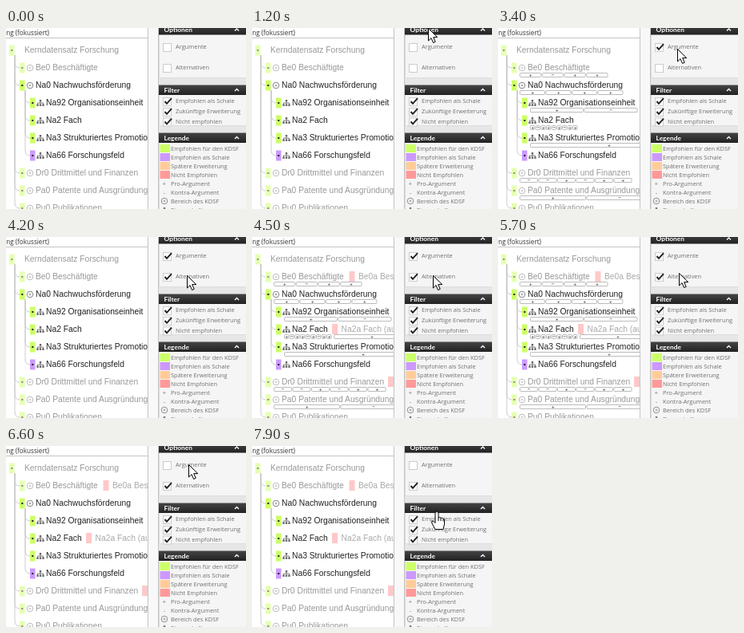
Recreate the animation shown at these times as an HTML page. Size 300 by 227 pixels, loop 8000 ms.

```html
<!DOCTYPE html>
<html lang="de">
<meta charset="utf-8">
<title>Kerndatensatz Forschung</title>
<style>
html, body { margin: 0; width: 100%; height: 100%; overflow: hidden; background: #fff }
svg { display: block }
.tree { font: 10.3px "Liberation Sans", Arial, sans-serif }
.panel { font: 7.45px "Open Sans", "Noto Sans", sans-serif; fill: #707070 }
.head { font: 700 8.4px Lato, "Open Sans", sans-serif; fill: #fff }
.sign { font: 700 6px "Liberation Sans", Arial, sans-serif; text-anchor: middle; fill: #555 }
</style>
<svg id="stage" width="300" height="227" viewBox="0 0 300 227">
  <defs>
    <clipPath id="treeClip"><path d="M0 14H177V227H0Z"/></clipPath>
    <linearGradient id="bar" x2="0" y2="1"><stop stop-color="#444"/><stop offset="1" stop-color="#222"/></linearGradient>
  </defs>
  <g id="tree" class="tree" clip-path="url(#treeClip)"></g>
  <path d="M178 0H190V227H178Z" fill="#f8f8f8"/>
  <path d="M190 0H300V227H190Z" fill="#e6e6e6"/>
  <path d="M0 12.5H177M177.5 0V227M190.5 0V227" stroke="#c4c4c4" fill="none"/>
  <text x="54" y="9" text-anchor="end" fill="#333" style="font:8.15px 'Open Sans','Noto Sans',sans-serif">Forschung (fokussiert)</text>
  <g id="panel" class="panel"></g>
  <path id="arrow" d="M.5 .5V16L4 12.6 6.6 18.5 9.2 17.3 6.7 11.6H11.8Z" fill="#fff" stroke="#000"/>
  <g id="hand" stroke="#000" stroke-linejoin="round">
    <path d="M-2 1.5Q0 -.8 2 1.5V8Q3.5 6.5 5 8.3Q7 7.3 8 9.3Q9.3 9 9.5 11V16L8 22.5H-2L-6 15Q-7 11.5 -4.5 12L-2 14.5Z" fill="#fff"/>
    <path d="M2 8V12M5 8.5V12M8 9.5V12.5" fill="none"/>
  </g>
</svg>
<script>
const $ = id => document.getElementById(id);
const text = (x, y, s, attrs = '') => `<text x="${x}" y="${y}" ${attrs}>${s}</text>`;
const rect = (x, y, w, h, attrs) => `<rect x="${x}" y="${y}" width="${w}" height="${h}" ${attrs}/>`;
const line = (d, color, width = 1) => `<path d="${d}" fill="none" stroke="${color}" stroke-width="${width}"/>`;

const area = (x, y, c) => `<g fill="none" stroke="${c}" stroke-width=".8"><circle cx="${x}" cy="${y}" r="3.8"/>
  <circle cx="${x}" cy="${y}" r="1" stroke-width=".6"/></g>`;
const shell = (x, y, c) => line(`M${x} ${y - 3}V${y + 2}M${x - 3.5} ${y + 2}V${y}H${x + 3.5}V${y + 2}`, c, .8) +
  [[0, -3.5], [-3.5, 2], [0, 2], [3.5, 2]].map(([dx, dy]) =>
    rect(x + dx - 1.2, y + dy - .5, 2.4, 2.4, `fill="${c}"`)).join('');

// label, level, faded, signs of the arguments, right end of the argument row
const nodes = [
  ['Kerndatensatz Forschung', 0, 1],
  ['Be0 Beschäftigte', 1, 1, '+-++', 138],
  ['Na0 Nachwuchsförderung', 1, 0, '++++', 157],
  ['Na92 Organisationseinheit', 2, 0, '+-', 175],
  ['Na2 Fach', 2, 0, '+-++-+-++', 100],
  ['Na3 Strukturiertes Promotionsprogramm', 2, 0, '+', 238],
  ['Na66 Forschungsfeld', 2, 0],
  ['Dr0 Drittmittel und Finanzen', 1, 1, '--+-++', 168],
  ['Pa0 Patente und Ausgründungen', 1, 1, '+-', 194],
  ['Pu0 Publikationen', 1, 1]
];
const rowY = i => 28 + 22 * i;

function branch(x, from, to) {
  return line(`M${x} ${from}V${to - 7}Q${x} ${to} ${x + 6} ${to}`, '#ccc');
}

function args(signs, left, right, y) {
  const w = (right - left) / signs.length;
  return [...signs].map((s, i) => {
    const x = left + i * w;
    return rect(x + .5, y - 2.5, w - 1.5, 5, 'rx="1" fill="#fff" stroke="#aaa" stroke-width=".8"') +
      text(x + w / 2, y + 2, s === '-' ? '−' : s, 'class="sign"');
  }).join('');
}

function alternative(x, row, label) {
  const y = rowY(row);
  return rect(x, y - 7, 7, 13, 'fill="#ffc8c8"') + text(x + 11.5, y + 3.4, label, 'fill="#aaa"');
}

let links = '', items = '', argRows = '';
nodes.forEach(([label, level, faded, signs, right], i) => {
  const y = rowY(i), x = 4 + 13 * level, ink = faded ? '#999' : '#222';
  if (level) links += branch(level === 1 ? 11 : 24, level === 1 ? 34 : 78, y);
  const fill = i === 6 ? '#c9f' : faded ? '#e5ffb2' : '#cf6';
  items += rect(x, y - 6.5, 6.5, 13, `fill="${fill}"`) +
    rect(x + 2.3, y - 1, 2, 2, `fill="${faded ? '#888' : '#222'}"`);
  if (level) items += (level === 1 ? area : shell)(x + 13, y, faded ? '#aaa' : '#666');
  items += text([23, 37, 50][level], y + 3.4, label, `fill="${ink}"`);
  if (signs) argRows += args(signs, 14 + 13 * level, right, y + 9);
});
$('tree').innerHTML = links + items + `<g id="args">${argRows}</g><g id="alts">` +
  alternative(121.5, 1, 'Be0a Beschäftigte') +
  alternative(100, 4, 'Na2a Fach (auch andere)') +
  alternative(170, 7, 'Dr0a Drittmittel') +
  `</g><g id="altArgs">${args('+', 102, 198, rowY(4) + 9)}</g>`;

const header = (y, label) => rect(191, y, 109, 12.5, 'fill="url(#bar)"') +
  text(197.5, y + 9.3, label, 'class="head"') +
  line(`M286 ${y + 7.5}L288.5 ${y + 5}L291 ${y + 7.5}`, '#fff', 1.3);
const frame = (y, h) => rect(191.5, y + .5, 112, h, 'fill="#f5f5f5" stroke="#ddd"');
const check = (y, label, id) => rect(196.5, y - 4.5, 10, 10, 'fill="#fff" stroke="#ccc"') +
  `<path id="${id}" d="M198.5 ${y}L201 ${y + 2.8}L207 ${y - 3.8}" fill="none" stroke="#222" stroke-width="2"/>` +
  text(212, y + 2.2, label);

const swatches = [['#cf6', 'Empfohlen für den KDSF'], ['#c9f', 'Empfohlen als Schale'],
  ['#fc9', 'Spätere Erweiterung'], ['#f99', 'Nicht Empfohlen']];
const symbols = ['Pro-Argument', 'Kontra-Argument', 'Bereich des KDSF', 'Eigenschaft'];
$('panel').innerHTML =
  frame(0, 62) + header(-4, 'Optionen') +
  check(24, 'Argumente', 'argCheck') + check(50, 'Alternativen', 'altCheck') +
  frame(72, 50) + header(71.5, 'Filter') +
  check(92, 'Empfohlen als Schale', 'shellCheck') + check(105, 'Zukünftige Erweiterung', 'laterCheck') +
  check(117.5, 'Nicht empfohlen', 'notCheck') +
  frame(132, 110) + header(131.5, 'Legende') +
  swatches.map(([c, s], i) => rect(192.5, 146 + 11 * i, 12.5, 10, `fill="${c}"`) +
    text(206, 154 + 11 * i, s)).join('') +
  symbols.map((s, i) => text(206, 198 + 11 * i, s)).join('') +
  text(198, 198, '+', 'text-anchor="middle"') + text(198, 209, '-', 'text-anchor="middle"') +
  area(198, 217, '#777') + shell(198, 229, '#777');

// start time, steps, from x, y, to x, y
const moves = [
  [1000, 7, 217, -16, 224, 24],
  [3400, 5, 224, 24, 226, 48],
  [5700, 5, 226, 48, 228, 23],
  [7500, 5, 228, 23, 231, 82]
];

function pointer(t) {
  const [start, steps, x0, y0, x1, y1] = moves.findLast(m => t >= m[0]);
  const k = Math.min(1, (Math.floor((t - start) / 100) + 1) / steps);
  const e = k * k * (3 - 2 * k);
  return [Math.round(x0 + (x1 - x0) * e), Math.round(y0 + (y1 - y0) * e)];
}

const show = (id, on) => $(id).setAttribute('visibility', on ? 'visible' : 'hidden');
const within = (t, a, b) => t >= a && t < b;

function draw(now) {
  const t = now % 8000;
  const both = within(t, 4500, 6300);
  show('argCheck', within(t, 2000, 6300));
  show('altCheck', t >= 4200);
  show('args', within(t, 2300, 4200) || both);
  show('alts', both || t >= 6600);
  show('altArgs', both);
  const [x, y] = t < 1000 ? [0, -50] : pointer(t);
  const link = y >= 70;
  show('arrow', !link);
  show('hand', link);
  $(link ? 'hand' : 'arrow').setAttribute('transform', `translate(${x} ${y})`);
  requestAnimationFrame(draw);
}
draw(performance.now());
</script>
</html>
```
